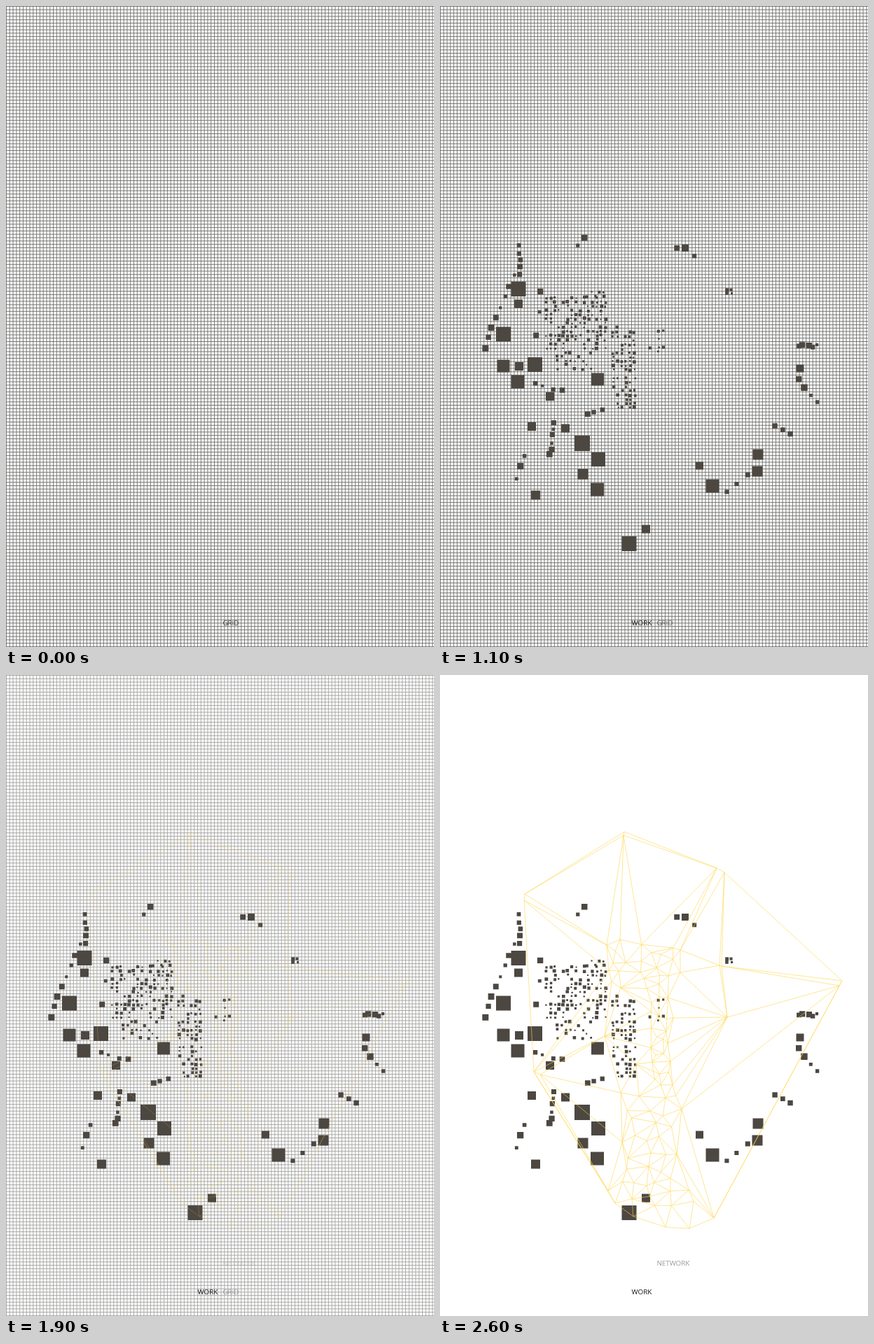
Write an HTML page that moves like this. It is 611 px wide and 916 px high and loops after 8 s.

```html
<!DOCTYPE html>
<html lang="en">
<head>
<meta charset="utf-8">
<title>Grid, work, network</title>
<style>
  html, body { margin: 0; width: 100%; height: 100%; overflow: hidden; background: #fff; }
  svg { display: block; width: 611px; height: 916px; }
  text { font: 9.8px "Open Sans", "Noto Sans", sans-serif; }
  #lines { stroke: #6b6b69; stroke-width: .9; }
  #squares { fill: #4c4741; }
  #mesh { fill: none; stroke: #ffd650; stroke-width: .6; stroke-linejoin: round; }
</style>
</head>
<body>
<svg viewBox="0 0 611 916">
  <g id="grid"><path id="lines"/></g>
  <g id="work"><path id="squares"/><text x="273.6" y="885.3" fill="#111">WORK</text></g>
  <text id="gridLabel" x="309.4" y="885.3" fill="#333">GRID</text>
  <g id="net"><path id="mesh"/><text x="309.4" y="843.6" fill="#999">NETWORK</text></g>
</svg>
<script>
const W = 611, H = 916, PITCH = 4.79, LOOP = 8000, STEP = 100, STEPS = 11;
const el = id => document.getElementById(id);

let seed = 11;
const random = (min = 0, max = 1) =>
  min + (max - min) * (seed = seed * 16807 % 2147483647) / 2147483647;

// Fine grid
let lines = '';
for (let x = .5; x < W; x += PITCH) lines += `M${x} 0V${H}`;
for (let y = .5; y < H; y += PITCH) lines += `M0 ${y}H${W}`;
el('lines').setAttribute('d', lines);

// Squares: the large ones are placed, the rest follow trails and loose blocks
let squares = '';
const square = (x, y, s) => squares += `M${x - s / 2} ${y - s / 2}h${s}v${s}h${-s}z`;
const trail = (x0, y0, x1, y1, n) => {
  for (let i = 0; i < n; i++) {
    const p = i / (n - 1);
    square(x0 + (x1 - x0) * p + random(-2, 2), y0 + (y1 - y0) * p + random(-2, 2), random(4, 9.5));
  }
};
const scatter = (x0, y0, cols, rows, keep) => {
  for (let i = 0; i < cols * rows; i++)
    if (random() < keep)
      square(x0 + i % cols * 6 + random(2, 4), y0 + Math.floor(i / cols) * 6 + random(2, 4), random(2, 5));
};

[[112, 404.5, 21], [112, 425.5, 12], [90.5, 469, 21], [90.5, 514.5, 18], [113, 515, 12],
 [135.5, 512.5, 21], [111, 537, 19], [225, 533.5, 18], [157, 558, 12], [131, 601, 12],
 [179, 603.5, 12], [203, 625, 22], [226, 648, 20], [204, 669, 15], [224.5, 691, 19],
 [136.5, 699, 13], [270, 768.5, 21], [294, 747.5, 12], [350, 346, 10], [514, 518, 11],
 [454, 641, 15], [453, 665, 15], [389, 686, 19], [370.5, 657, 11]].forEach(s => square(...s));

trail(114.5, 342, 115, 384, 5);
trail(105, 385, 63, 490, 8);
trail(145, 407, 136, 469, 3);
trail(134, 538, 173, 551, 4);
trail(209, 583, 230, 575, 3);
trail(195.5, 342, 208, 333, 2);
trail(164, 596, 156, 641, 6);
trail(120, 643, 109, 674, 3);
trail(339.5, 344, 364, 356, 2);
trail(511, 486, 540, 486, 5);
trail(512, 534, 538, 566, 4);
trail(479, 600, 500, 613, 3);
trail(438, 670, 411, 694, 3);

scatter(149, 414, 15, 13, .54);
scatter(207, 406, 5, 2, .5);
scatter(165, 492, 9, 5, .35);
scatter(244, 457, 6, 9, .6);
scatter(245, 511, 6, 11, .35);
scatter(297, 461, 4, 6, .35);
scatter(407, 402, 2, 2, .9);
el('squares').setAttribute('d', squares);

// Mesh: Delaunay triangles over key corners and evenly spread inner points
const pts = [
  [263, 224], [262, 229], [395, 276], [406, 282], [574, 437], [570, 444], [121, 313], [120, 322],
  [134, 567], [143, 571], [240, 737], [250, 755], [322, 789], [356, 791], [391, 776], [399, 415],
  [402, 416], [410, 489], [257, 378], [238, 386], [333, 390], [343, 393], [343, 425], [258, 447],
  [235, 516], [333, 490], [280, 556], [258, 597], [345, 620], [338, 685], [362, 752]];
const gap = ([ax, ay], [bx, by]) => Math.hypot(ax - bx, ay - by);
const nearest = p => Math.min(...pts.map(q => gap(p, q)));
const spread = (x0, y0, x1, y1, n) => {
  while (n--) {
    const tries = Array.from({ length: 6 }, () => [random(x0, x1), random(y0, y1)]);
    pts.push(tries.reduce((a, b) => nearest(b) > nearest(a) ? b : a));
  }
};
spread(236, 384, 338, 448, 18);
spread(300, 455, 334, 590, 22);
spread(256, 592, 338, 730, 24);
spread(270, 730, 360, 775, 7);

const emptyCircle = ([ax, ay], [bx, by], [cx, cy]) => {
  bx -= ax; by -= ay; cx -= ax; cy -= ay;
  const area = 2 * (bx * cy - by * cx);
  if (!area) return false;
  const b2 = bx * bx + by * by, c2 = cx * cx + cy * cy;
  const ux = (cy * b2 - by * c2) / area, uy = (bx * c2 - cx * b2) / area;
  const r2 = ux * ux + uy * uy - 1e-6;
  return pts.every(([x, y]) => (x - ax - ux) ** 2 + (y - ay - uy) ** 2 >= r2);
};
const edges = new Set();
const addEdge = (p, q) => edges.add(`M${p}L${q}`);
pts.forEach((a, i) => {
  for (let j = i + 1; j < pts.length; j++)
    for (let k = j + 1; k < pts.length; k++)
      if (emptyCircle(a, pts[j], pts[k])) {
        addEdge(a, pts[j]); addEdge(pts[j], pts[k]); addEdge(a, pts[k]);
      }
});
el('mesh').setAttribute('d', [...edges].join(''));

// Cross-fades in even steps
const fade = (t, start) => Math.min(1, Math.max(0, Math.floor((t - start) / STEP) / STEPS));
function draw(now) {
  const t = now % LOOP;
  const work = fade(t, 0), net = fade(t, 1500);
  el('grid').style.opacity = 1 - net;
  el('work').style.opacity = work;
  el('gridLabel').style.opacity = (1 - .3 * work) * (1 - net);
  el('net').style.opacity = net;
  requestAnimationFrame(draw);
}
draw(0);
</script>
</body>
</html>
```
